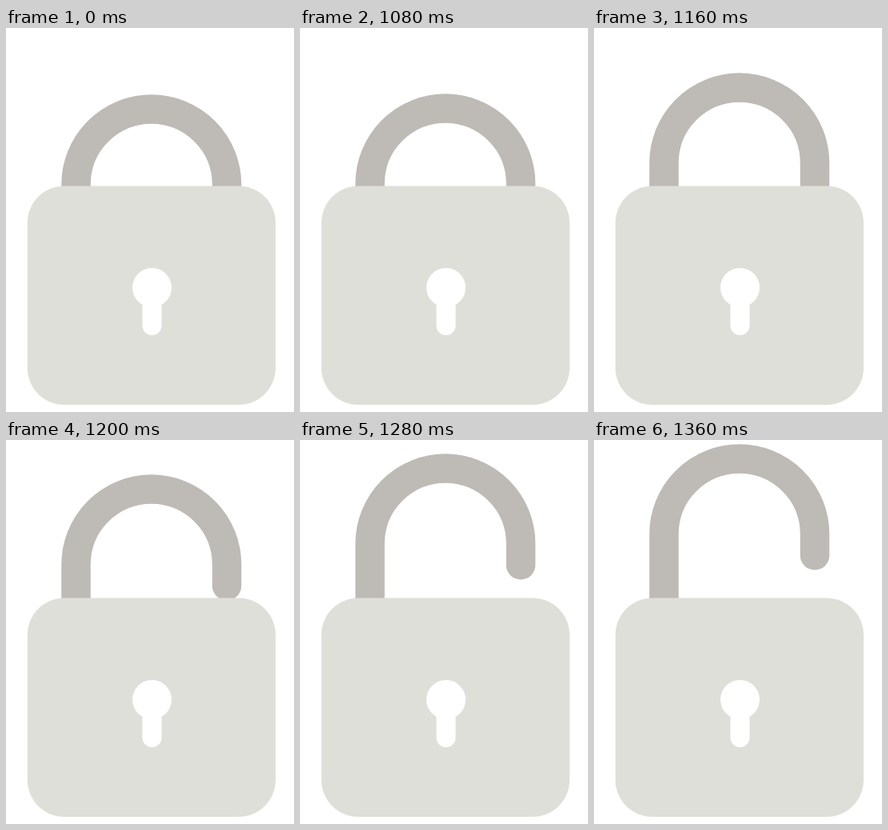
Write an HTML page with a canvas that moves like this. It is 360 px wide and 480 px high and loops after 2040 ms.

```html
<!DOCTYPE html>
<html lang="en">
<head>
<meta charset="utf-8">
<title>Padlock</title>
<style>
  html, body { margin: 0; width: 100%; height: 100%; overflow: hidden; background: #fff; }
  canvas { display: block; width: 360px; height: 480px; }
</style>
</head>
<body>
<canvas id="stage" width="360" height="480"></canvas>
<script>
const ctx = document.getElementById('stage').getContext('2d');
const LOOP = 2040, STEP = 40, OPEN_AT = 1080, MAX_LIFT = 78;
const BODY = '#dfdfd9', SHACKLE = '#bebab5';

// The shackle rises at a steady pace, one move per step, then snaps shut on loop.
function liftAt(t) {
  if (t < OPEN_AT) return 0;
  const step = Math.floor((t - OPEN_AT) / STEP);
  return Math.min(MAX_LIFT, 1 + 13 * step);
}

function roundRect(x, y, w, h, r, color) {
  ctx.fillStyle = color;
  ctx.beginPath();
  ctx.roundRect(x, y, w, h, r);
  ctx.fill();
}

function drawShackle(lift) {
  const cx = 181.75, cy = 195.75 - lift, r = 94.25;
  ctx.strokeStyle = SHACKLE;
  ctx.lineWidth = 36.5;
  ctx.lineCap = 'round';
  ctx.beginPath();
  ctx.moveTo(cx - r, 225);
  ctx.lineTo(cx - r, cy);
  ctx.arc(cx, cy, r, Math.PI, 0);
  ctx.lineTo(cx + r, cy + 26.5);
  ctx.stroke();
}

function drawBody() {
  roundRect(26.75, 197.5, 310.25, 273.5, 46, BODY);
  ctx.fillStyle = '#fff';
  ctx.beginPath();
  ctx.arc(182.5, 324.5, 24.5, 0, Math.PI * 2);
  ctx.fill();
  roundRect(170.5, 325, 24, 59, 12, '#fff');
}

function render(now) {
  ctx.fillStyle = '#fff';
  ctx.fillRect(0, 0, 360, 480);
  drawShackle(liftAt(now % LOOP));
  drawBody();
}

const start = performance.now();
function tick() {
  render(performance.now() - start);
  requestAnimationFrame(tick);
}
tick();
</script>
</body>
</html>
```
